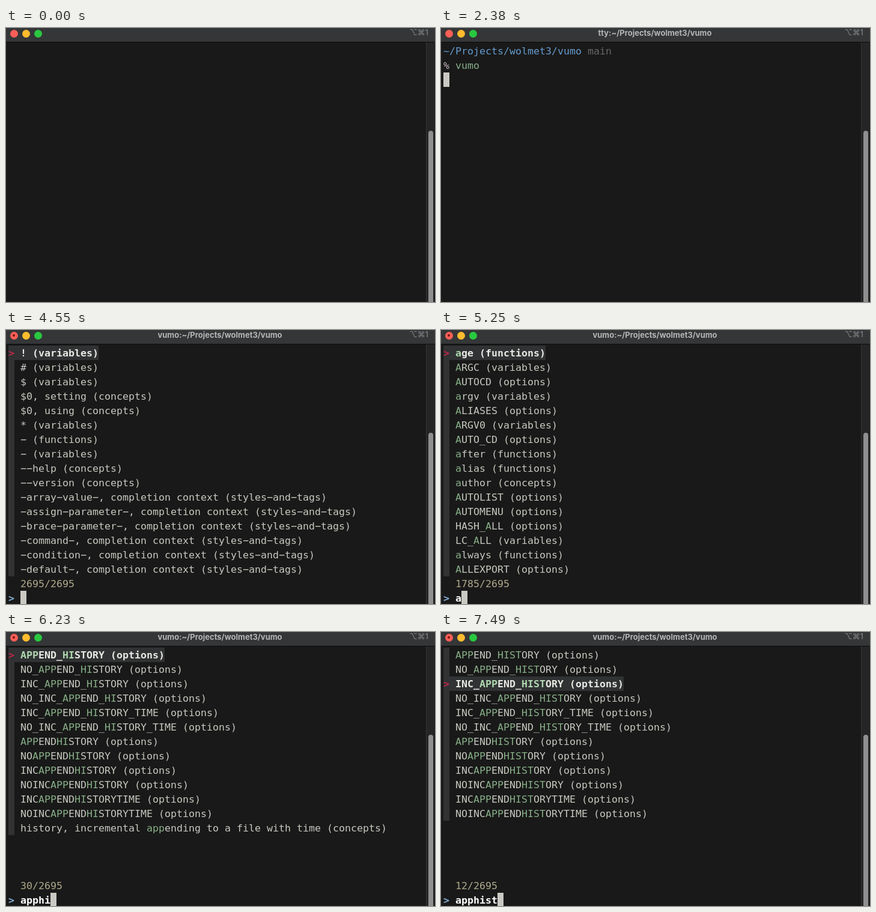
Animation of 714 by 456 pixels, one loop 8 s. Source, as an HTML page:

```html
<!DOCTYPE html>
<html lang="en">
<head>
<meta charset="utf-8">
<title>Terminal finder</title>
<style>
  html, body { margin: 0; width: 100%; height: 100%; overflow: hidden; background: #191919; }
  #stage { position: relative; width: 714px; height: 456px; overflow: hidden; background: #191919; }
  #stage div { position: absolute; white-space: pre; }
  .bar { left: 0; top: 0; width: 714px; height: 23px; background: #343638; border-bottom: 1px solid #0c0c0c; }
  .light { top: 2.5px; width: 13px; height: 13px; border-radius: 50%; }
  .dot { left: 11px; top: 7px; width: 4px; height: 4px; border-radius: 50%; background: #7c1512; }
  .keys { right: 11px; top: 0; font: 500 13px/15px Inter, "DejaVu Sans", sans-serif; color: #7d7f81; }
  .track { left: 699px; top: 24px; width: 14px; height: 432px; background: #252525; border-left: 1px solid #343434; box-sizing: border-box; }
  .thumb { left: 703px; top: 171px; width: 8px; height: 300px; border-radius: 4px; background: #8f8f8f; }
  .screen { left: 0; top: 0; width: 699px; height: 456px; opacity: 0;
    font: 16.61px/26px "DejaVu Sans Mono", monospace; color: #c8c8c1; }
  .line { height: 24px; }
  .title { left: 0; top: 0; width: 712px; text-align: center;
    font: 700 13px/17px Inter, sans-serif; color: #b5b6b7; }
  .gutter { left: 4px; top: 26px; width: 10px; background: #323232; }
  .pick { background: #303233; font-weight: bold; color: #e8e8e4; }
  .cursor { width: 10px; background: #c9c8c3; color: #191919; }
  .path { color: #659cce; }
  .dim { color: #686868; }
  .sign { color: #c9b8c6; }
  .cmd, .hit { color: #87af87; }
  .pick .hit { color: #afd7af; }
  .arrow { color: #c02849; font-weight: bold; }
  .ask { color: #87afd7; font-weight: bold; }
  .query { color: #fff; font-weight: bold; }
  .count { color: #afaa8c; }
</style>
</head>
<body>
<div id="stage">
  <div class="bar"></div>
  <div class="light" style="left:6.5px;background:#fe5f57"></div>
  <div class="light" style="left:26.5px;background:#febc2e"></div>
  <div class="light" style="left:46.5px;background:#29c840"></div>
  <div class="keys">⌥⌘1</div>
  <div class="track"></div>
  <div class="thumb"></div>
</div>
<script>
const LOOP = 8000, CELL = 10, ROW = 24, LEFT = 4, TOP = 26;
const APP = "vumo", PATH = "~/Projects/wolmet3/" + APP;
const stage = document.getElementById("stage");

const span = (cls, text) => `<span class="${cls}">${text}</span>`;
const at = (col, row, html, cls = "") =>
  `<div class="line ${cls}" style="left:${LEFT + col * CELL}px;top:${TOP + row * ROW}px">${html}</div>`;
const title = name => `<div class="title">${name}:${PATH}</div>`;
const wide = text => text.replace(/-/g, "\u2212");

// Highlight the query parts in order, word starts first.
function mark(text, parts) {
  let out = "", rest = text;
  for (const part of parts) {
    let i = rest.search(new RegExp("(?<![a-z])" + part, "i"));
    if (i < 0) i = rest.search(new RegExp(part, "i"));
    if (i < 0) break;
    const end = i + part.length;
    out += rest.slice(0, i) + span("hit", rest.slice(i, end));
    rest = rest.slice(end);
  }
  return out + rest;
}

function shell(typed, ghost = "", entered = false) {
  const col = entered ? 0 : 2 + typed.length;
  return title("tty") +
    at(0, 0, span("path", PATH) + span("dim", " main")) +
    at(0, 1, span("sign", "% ") + span("cmd", typed) + span("dim", ghost)) +
    at(col, entered ? 2 : 1, ghost[0] || "", "cursor");
}

function finder(items, count, parts = [], pick = 0) {
  const query = parts.join("");
  const rows = items.map((item, i) => {
    const text = mark(wide(item), parts);
    return i === pick
      ? at(0, i, span("arrow", "&gt;") + " " + text, "pick")
      : at(2, i, text);
  });
  return title(APP) +
    `<div class="gutter" style="height:${items.length * ROW}px"></div>` + rows.join("") +
    at(2, 16, count + "/2695", "count") +
    at(0, 17, span("ask", "&gt; ") + span("query", query)) +
    at(2 + query.length, 17, "", "cursor");
}

const tag = (kind, names) => names.split("|").map(name => `${name} (${kind})`);

const all = [
  ...tag("variables", "!|#|$"), ...tag("concepts", "$0, setting|$0, using"),
  "* (variables)", "- (functions)", "- (variables)",
  ...tag("concepts", "--help|--version"),
  ...["array-value", "assign-parameter", "brace-parameter", "command", "condition", "default"]
    .map(name => `-${name}-, completion context (styles-and-tags)`)
];
const listA = [
  "age (functions)", "ARGC (variables)", "AUTOCD (options)", "argv (variables)",
  "ALIASES (options)", "ARGV0 (variables)", "AUTO_CD (options)",
  ...tag("functions", "after|alias"), "author (concepts)",
  ...tag("options", "AUTOLIST|AUTOMENU|HASH_ALL"),
  "LC_ALL (variables)", "always (functions)", "ALLEXPORT (options)"
];
const timed = "history, incremental appending to a file with time (concepts)";
const listApp = [
  ...tag("options", "HIST_APPEND|APPENDCREATE|APPENDHISTORY|APPEND_CREATE|APPEND_HISTORY|NO_HIST_APPEND"),
  "_approximate (functions)",
  ...tag("options", "NO_APPEND_CREATE|NO_APPEND_HISTORY|INC_APPEND_HISTORY|NO_INC_APPEND_HISTORY|INC_APPEND_HISTORY_TIME|NO_INC_APPEND_HISTORY_TIME"),
  ...tag("concepts", "history, appending to a file|history, incremental appending to a file"), timed
];
const hist = ["APPEND_HISTORY", "NO_APPEND_HISTORY", "INC_APPEND_HISTORY", "NO_INC_APPEND_HISTORY",
  "INC_APPEND_HISTORY_TIME", "NO_INC_APPEND_HISTORY_TIME"];
const listHist = tag("options", [...hist, ...hist.map(name => name.replace(/_/g, ""))].join("|"));
const listHis = [...listHist, timed];

const steps = [
  [0, shell("")],
  [770, shell(APP.slice(0, 1), APP.slice(1))],
  [1330, shell(APP.slice(0, 2), APP.slice(2))],
  [1400, shell(APP.slice(0, 3), APP.slice(3))],
  [1540, shell(APP)],
  [2380, shell(APP, "", true)],
  [2450, finder(all, 2695)],
  [5250, finder(listA, 1785, ["a"])],
  [5530, finder(listApp, 612, ["ap"])],
  [5670, finder(listApp, 259, ["app"])],
  [6160, finder(listHis, 44, ["app", "h"])],
  [6230, finder(listHis, 30, ["app", "hi"])],
  [6370, finder(listHis, 22, ["app", "his"])],
  [6510, finder(listHist, 12, ["app", "hist"])],
  [7140, finder(listHist, 12, ["app", "hist"], 1)],
  [7490, finder(listHist, 12, ["app", "hist"], 2)]
];

const start = document.timeline.currentTime || 0;

// Visible only between two times, with hard cuts.
function show(cls, html, from, to = LOOP) {
  const el = document.createElement("div");
  el.className = cls;
  el.innerHTML = html;
  stage.append(el);
  const frames = [[0, 0], [from, 1], [to, 0], [LOOP, 0]].map(([time, opacity]) =>
    ({ offset: time / LOOP, opacity, easing: "step-end" }));
  el.animate(frames, { duration: LOOP, iterations: Infinity }).startTime = start;
}

steps.forEach(([time, html], i) => show("screen", html, time, steps[i + 1]?.[0]));
show("dot", "", 3150);
</script>
</body>
</html>
```
